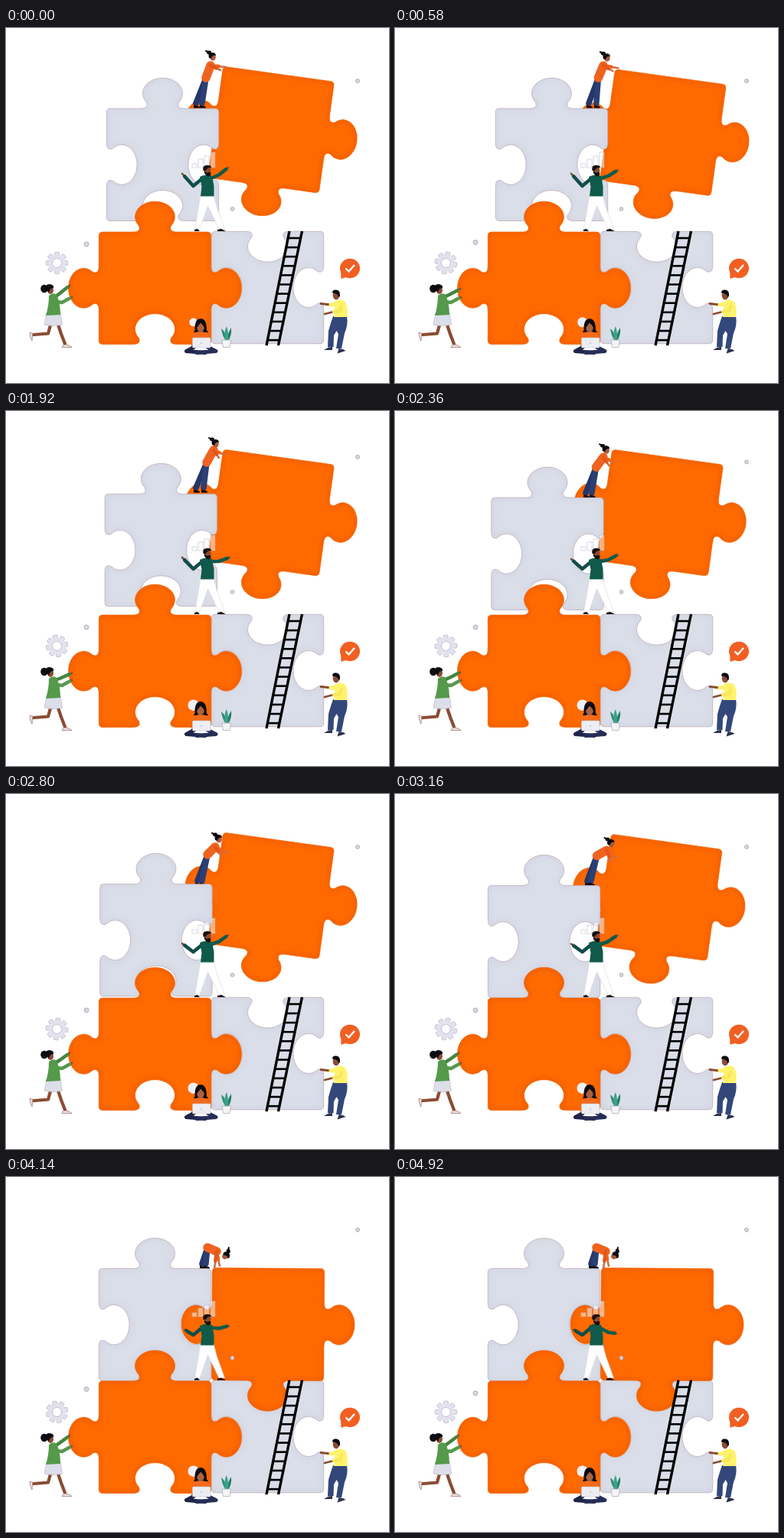
Recreate the animation shown at these times as an HTML page. Size 500 px wide and 463 px high, loop 4.94 s.

```html
<!DOCTYPE html>
<html lang="en">
<head>
<meta charset="utf-8">
<title>Puzzle team</title>
<style>
html, body { margin: 0; width: 100%; height: 100%; overflow: hidden; background: #fff; }
svg { display: block; width: 500px; height: 463px; }
</style>
</head>
<body>
<svg id="stage" viewBox="0 0 500 463" xmlns="http://www.w3.org/2000/svg">
  <defs><filter id="soft" x="-20%" y="-20%" width="140%" height="140%"><feGaussianBlur stdDeviation="3"/></filter></defs>
</svg>
<script>
const LOOP = 4940;
const NS = 'http://www.w3.org/2000/svg';
const stage = document.getElementById('stage');
const ORANGE = '#ff6a00', GREY = '#dadee8', NAVY = '#2c3f72', SKIN = '#8a4c34', TAN = '#c9704a', INK = '#0c0b12';

function add(parent, tag, attrs) {
  const node = document.createElementNS(NS, tag);
  for (const key in attrs) node.setAttribute(key, attrs[key]);
  return parent.appendChild(node);
}
const group = () => add(stage, 'g', {});
const fill = (g, d, color, extra) => add(g, 'path', { d, fill: color, ...extra });
const oval = (g, cx, cy, rx, ry, color, extra) => add(g, 'ellipse', { cx, cy, rx, ry, fill: color, ...extra });
const limb = (g, color, width, d = '') => add(g, 'path', {
  d, fill: 'none', stroke: color, 'stroke-width': width, 'stroke-linecap': 'round', 'stroke-linejoin': 'round'
});
const line = (...pts) => 'M' + pts.map(p => p[0].toFixed(2) + ' ' + p[1].toFixed(2)).join('L');
const mix = (a, b, u) => [a[0] + (b[0] - a[0]) * u, a[1] + (b[1] - a[1]) * u];
const move = (node, x, y, turn = 0) => node.setAttribute('transform', `translate(${x} ${y}) rotate(${turn})`);

// Rows are [time, ...values]; values ease between rows and hold at the ends.
function at(rows, t) {
  if (t <= rows[0][0]) return rows[0].slice(1);
  for (let i = 1; i < rows.length; i++) {
    const a = rows[i - 1], b = rows[i];
    if (t < b[0]) {
      const u = (1 - Math.cos(Math.PI * (t - a[0]) / (b[0] - a[0]))) / 2;
      return a.slice(1).map((v, k) => v + (b[k + 1] - v) * u);
    }
  }
  return rows[rows.length - 1].slice(1);
}

// Outline around the centre; sides run top, right, bottom, left: 1 tab, -1 notch, 0 flat.
function outline(sides) {
  const h = 73.25, r = 5;
  let d = '';
  sides.forEach((k, i) => {
    const c = Math.cos(i * Math.PI / 2), s = Math.sin(i * Math.PI / 2);
    const p = (x, out) => {
      const y = -h - out;
      return (x * c - y * s).toFixed(2) + ' ' + (x * s + y * c).toFixed(2) + ' ';
    };
    d += (i ? 'L' : 'M') + p(r - h, 0);
    if (k) {
      d += 'L' + p(-29, 0) + 'C' + p(-21, 0) + p(-19, 3 * k) + p(-21, 8 * k)
        + `A26 20 ${i * 90} 1 ${k > 0 ? 1 : 0} ` + p(21, 8 * k)
        + 'C' + p(19, 3 * k) + p(21, 0) + p(29, 0);
    }
    d += 'L' + p(h - r, 0) + 'Q' + p(h, 0) + p(h, -r);
  });
  return d + 'Z';
}

let count = 0;
function piece(sides, color, x, y) {
  const g = group(), d = outline(sides), id = 'edge' + count++, warm = color === ORANGE;
  fill(add(g, 'clipPath', { id }), d, '#000');
  fill(g, d, color);
  const inner = add(g, 'g', { 'clip-path': `url(#${id})` });
  fill(inner, d, 'none', {
    stroke: warm ? '#e95c00' : '#cfd3e2', 'stroke-width': 6, opacity: 0.7, filter: 'url(#soft)'
  });
  fill(g, d, 'none', { stroke: warm ? '#f36a0e' : '#b79aa6', 'stroke-width': 0.6 });
  move(g, x, y);
  return g;
}

// --- back layers ---
piece([-1, -1, 0, -1], GREY, 341.5, 338.5);
const rightTop = piece([0, 1, 1, 1], ORANGE, 346, 132.5);

// --- woman on top ---
const pusher = group();
const SHIRT = '#f0621f';
const legA = limb(pusher, '#25366a', 7.5), legB = limb(pusher, NAVY, 7.5);
const shoe = 'M-3 1h8q0 -3 -4 -3l-4 -1z';
const shoeA = fill(pusher, shoe, INK), shoeB = fill(pusher, shoe, INK);
const armA = limb(pusher, TAN, 2.6), armB = limb(pusher, TAN, 2.6);
const torso = limb(pusher, SHIRT, 11.5);
const sleeveA = limb(pusher, SHIRT, 4.5), sleeveB = limb(pusher, '#e3561a', 4.5);
const pusherHead = add(pusher, 'g', {});
oval(pusherHead, 1, 1, 3.8, 4.5, '#a85a3c');
fill(pusherHead, 'M-4 2Q-6 -5 0 -5Q5 -5 5 -1Q0 -2 -1 3Z', INK);
oval(pusherHead, -4, -5, 3, 2.4, INK);
limb(pusherHead, INK, 2, 'M-6 -6l-2 -1');

// --- upper grey and lower orange ---
const leftTop = piece([1, -1, -1, -1], GREY, 194.5, 192.75);
piece([1, 1, -1, 1], ORANGE, 194.5, 339.25);

// --- bar chart ---
const chart = group();
[5, 11, 15, 20].forEach((height, i) => add(chart, 'rect', {
  x: 243 + i * 8, y: 182 - height, width: 6, height,
  fill: '#fff', 'fill-opacity': 0.5, stroke: '#b4b7c8', 'stroke-opacity': 0.65, 'stroke-width': 0.8
}));

// --- ladder ---
const ladder = group();
add(ladder, 'path', { d: 'M370 265L340 414M386.500 265L355.500 414', stroke: '#000', 'stroke-width': 3.4 });
for (let y = 274; y < 412; y += 12.1) {
  const u = (y - 265) / 149;
  add(ladder, 'path', { d: line([370 - 30 * u, y], [386.5 - 31 * u, y]), stroke: '#000', 'stroke-width': 2.6 });
}

// --- floating dots ---
const dot = (x, y, r) => {
  const node = oval(group(), 0, 0, r, r, '#d6d7e2', { stroke: '#a8a4b0', 'stroke-width': 0.8 });
  move(node, x, y);
  return node;
};
const dotRight = dot(459, 69, 2.5), dotLeft = dot(105, 282, 3);
dot(295.5, 236, 2.4);

// --- gear ---
const gear = group(), RIM = { stroke: '#bdb9cb', 'stroke-width': 0.8 };
for (let i = 0; i < 8; i++) {
  add(gear, 'rect', { x: -3, y: -14.2, width: 6, height: 8, rx: 1, fill: '#e1e2ed', ...RIM, transform: `rotate(${i * 45})` });
}
oval(gear, 0, 0, 8.3, 8.3, 'none', { stroke: '#e1e2ed', 'stroke-width': 4.8 });
oval(gear, 0, 0, 6, 6, '#fff', RIM);

// --- check bubble ---
const badge = group();
fill(badge, 'M437 312L437.500 327L447 324Z', '#f15f22');
oval(badge, 449, 313.5, 13, 12.7, '#f15f22');
add(badge, 'path', { d: 'M443.500 313.500L447.500 317.500L455 309', fill: 'none', stroke: '#fff', 'stroke-width': 2.4 });

// --- man in the middle ---
const man = group(), GREEN = '#0f5a4b';
fill(man, 'M254 217H271L275 233L285.500 262H278L263.500 232L253 262H246.500L251 236Z', '#fff', { stroke: '#ddd3dc', 'stroke-width': 0.6 });
fill(man, 'M246 265v-2l4 -1l3 3zM276 265v-2l5 -1l6 3z', INK);
const manHandL = limb(man, SKIN, 2.6), manHandR = limb(man, SKIN, 2.6);
const manArmL = limb(man, '#124c49', 4.6), manArmR = limb(man, GREEN, 4.6);
fill(man, 'M253 194Q261 190 269 193L271.500 206V219.500H254L255.500 207Z', GREEN);
oval(man, 263, 185.5, 4.4, 5.8, SKIN);
fill(man, 'M257.500 186Q256 179 262 179Q268 178.500 268 182Q262 182 261 186Z', '#17110f');
fill(man, 'M258.500 186L262 189Q266 187 267.500 189Q267.500 193.500 264 193.500Q259 192 258.500 186Z', '#17110f');

// --- woman on the left ---
const girl = group(), LEAF = '#55994b', SOLE = { stroke: '#8d6156', 'stroke-width': 0.6 };
limb(girl, SKIN, 4.2, 'M67 384L72 399L77 412');
limb(girl, SKIN, 4.2, 'M59 384L55 398.500L36 400');
fill(girl, 'M73 416.500H86Q84 414 79 413L75 413Z', '#e9dfe0', SOLE);
fill(girl, 'M31 397L35 398L34 408Q31 404 31 397Z', '#e9dfe0', SOLE);
fill(girl, 'M53 372L71 371L73.500 387Q62 390 50 387Z', '#dcdfea', { stroke: '#b9b3c0', 'stroke-width': 0.6 });
const girlHandA = limb(girl, SKIN, 2.6), girlHandB = limb(girl, SKIN, 2.6);
const girlArmA = limb(girl, '#448540', 4.5), girlArmB = limb(girl, LEAF, 4.5);
fill(girl, 'M56 349Q62 344 66 348Q71 358 71 374L52 375Q56 362 56 349Z', LEAF);
oval(girl, 58, 342, 4, 5, SKIN);
fill(girl, 'M53 341Q50 334 57 334Q63 335 62 339Q57 339 56 345Z', INK);
oval(girl, 50, 340, 4.8, 5.2, INK);

// --- man in yellow ---
const helper = group(), YELLOW = '#fff36b', DENIM = '#33477a';
fill(helper, 'M427 376H445Q447 387 442 398L438 418H431L434 399L431.500 395L428 401L427.500 416H420L421 395Q424 384 427 376Z', DENIM);
fill(helper, 'M415 420H426V416L421 416.500ZM432.500 424.500L434.500 418L440 419L443.500 421Z', '#2d3350');
limb(helper, SKIN, 2.8, 'M424 361L411 359.500');
limb(helper, SKIN, 2.8, 'M428 370L416 373');
limb(helper, YELLOW, 5, 'M434 360L424 361');
fill(helper, 'M428 357Q438 352 443 357Q447 366 445 377L428 377Q430 366 428 357Z', YELLOW);
limb(helper, '#f6e85f', 4.5, 'M438 363L436 369L428 370');
oval(helper, 431, 348.5, 4.3, 6, SKIN);
fill(helper, 'M426 345.500Q426 341 431 341.500Q437 342 436 350L434 351Q434 346 426 345.500Z', INK);

// --- woman with laptop, speech spot, plant ---
const spot = oval(group(), 0, 0, 7, 7, '#efeff4');
const coder = group();
fill(coder, 'M246.500 394Q246 379 254 379Q262 379 262 394L264 397H245Z', INK);
fill(coder, 'M243 401Q246 396 254 396Q262 396 266 401L267 415H242Z', '#f36a1c');
oval(coder, 254, 390.5, 4.8, 6.2, '#a9613f');
fill(coder, 'M249 391Q248 382 254 382Q260 382 259.500 391Q257 387 254 384.500Q252 387 249 391Z', INK);
limb(coder, '#1f2548', 5, 'M245 416.500L235.500 421.500L260 423.500');
limb(coder, '#262e58', 5, 'M264 416.500L274 421.500L249 423.500');
add(coder, 'rect', { x: 243.5, y: 404, width: 23.5, height: 13, rx: 1.2, fill: '#eceef3', stroke: '#c4c7d4', 'stroke-width': 0.6 });
oval(coder, 255, 411, 1.1, 1.1, '#c2c5d2');

const plant = group();
fill(plant, 'M287 408Q282 401 281 392Q287 396 288 408Z', '#2f8d76');
fill(plant, 'M289 408Q289 398 294 391Q295 401 290 408Z', '#257a66');
fill(plant, 'M286 408Q284 396 288 389Q291 398 290 408Z', '#3aa287');
fill(plant, 'M282 407H293.500L292 416.500H283.500Z', '#f4f4f7', { stroke: '#a9a7b2', 'stroke-width': 0.7 });

// --- motion tables ---
const sway = [[0, 0], [900, 5.3], [1800, 0]];
const dropX = [[3030, 0], [3560, -9], [4100, -4]];
const dropY = [[3030, 0], [4100, 59.5]];
const dropTurn = [[3480, 7.9], [4100, 0.4]];
const settle = [[1300, 10, -14.5], [3300, 0, 0]];
const bobLeft = [[300, 282], [1200, 271], [1900, 282], [3150, 282], [3820, 271], [4450, 282]];
const bobRight = [[1300, 69], [1920, 60], [2600, 69]];
const grow = [[0, 5.4], [1000, 7.2]];
// head, shoulder, hip, hand, two feet
const climb = [
  [0, 269, 37, 267, 49, 261, 65, 287, 51, 248, 102, 256, 102],
  [1000, 280, 39, 275, 49, 268, 65, 294, 53, 256, 102, 267, 102],
  [1250, 279, 39, 274, 49, 267, 65, 293, 53, 255, 102, 266, 102],
  [1900, 273, 42, 271, 51, 262, 67, 285, 57, 248, 104, 258, 104],
  [2800, 277, 58, 273, 69, 263, 79, 288, 77, 250, 117, 256, 117],
  [3520, 286, 70, 279, 78, 264, 82, 290, 90, 252, 117, 256, 117],
  [4140, 287, 102, 275, 97, 263, 92, 279, 116, 256, 117, 261, 117]
];
// left hand, right hand
const wave = [
  [0, 230, 190, 290, 182], [1200, 230, 190, 292, 189], [1920, 230, 191, 292, 191],
  [2800, 230, 195, 290, 184], [3520, 230, 196, 291, 184], [4140, 233, 199, 291, 194], [4920, 233, 199, 289, 204]
];
const push = [[0, 83, 336], [900, 86, 342], [2100, 86, 342], [2800, 83, 338], [4940, 83, 337]];

const setPath = (node, ...pts) => node.setAttribute('d', line(...pts));

function drawPusher(t) {
  const v = at(climb, t);
  const [head, neck, hip, hand, footA, footB] = [0, 2, 4, 6, 8, 10].map(i => [v[i], v[i + 1]]);
  const hand2 = [hand[0] - 7, hand[1] + 4];
  setPath(torso, neck, hip);
  setPath(legA, mix(hip, footA, 0.08), [footA[0], footA[1] - 4]);
  setPath(legB, mix(hip, footB, 0.08), [footB[0], footB[1] - 4]);
  move(shoeA, footA[0], footA[1] + 1.5);
  move(shoeB, footB[0], footB[1] + 1.5);
  setPath(armA, neck, hand);
  setPath(armB, neck, hand2);
  setPath(sleeveA, neck, mix(neck, hand, 0.55));
  setPath(sleeveB, neck, mix(neck, hand2, 0.55));
  move(pusherHead, head[0], head[1], at([[3520, 0], [4140, 70]], t)[0]);
}

function drawArm(sleeve, hand, from, elbow, to) {
  setPath(hand, elbow, to);
  setPath(sleeve, from, elbow, mix(elbow, to, 0.78));
}

function draw(t) {
  const s = at(sway, t)[0];
  move(rightTop, 346 + s + at(dropX, t)[0], 132.7 + s * 0.95 + at(dropY, t)[0], at(dropTurn, t)[0]);
  const [cx, cy] = at(settle, t);
  move(leftTop, 194.5 + cx, 192.75 + cy);
  drawPusher(t);

  const [lx, ly, rx, ry] = at(wave, t);
  drawArm(manArmL, manHandL, [256, 196.5], [244.5, 206], [lx, ly]);
  drawArm(manArmR, manHandR, [267, 196.5], [278, (195 + ry) / 2 + 3], [rx, ry]);

  const [hx, hy] = at(push, t);
  drawArm(girlArmA, girlHandA, [64, 351], [71, (351 + hy) / 2 + 2], [hx, hy]);
  drawArm(girlArmB, girlHandB, [66, 357], [73, 358], [86, 351]);

  move(dotLeft, 105, at(bobLeft, t)[0]);
  move(dotRight, 459, at(bobRight, t)[0]);
  move(gear, 66.5, 306.5, 90 * t / LOOP);
  const r = at(grow, t)[0];
  spot.setAttribute('rx', r);
  spot.setAttribute('ry', r);
  move(spot, 244.7, 383.7);
}

const start = performance.now();
function tick() {
  draw((performance.now() - start) % LOOP);
  requestAnimationFrame(tick);
}
tick();
</script>
</body>
</html>
```
